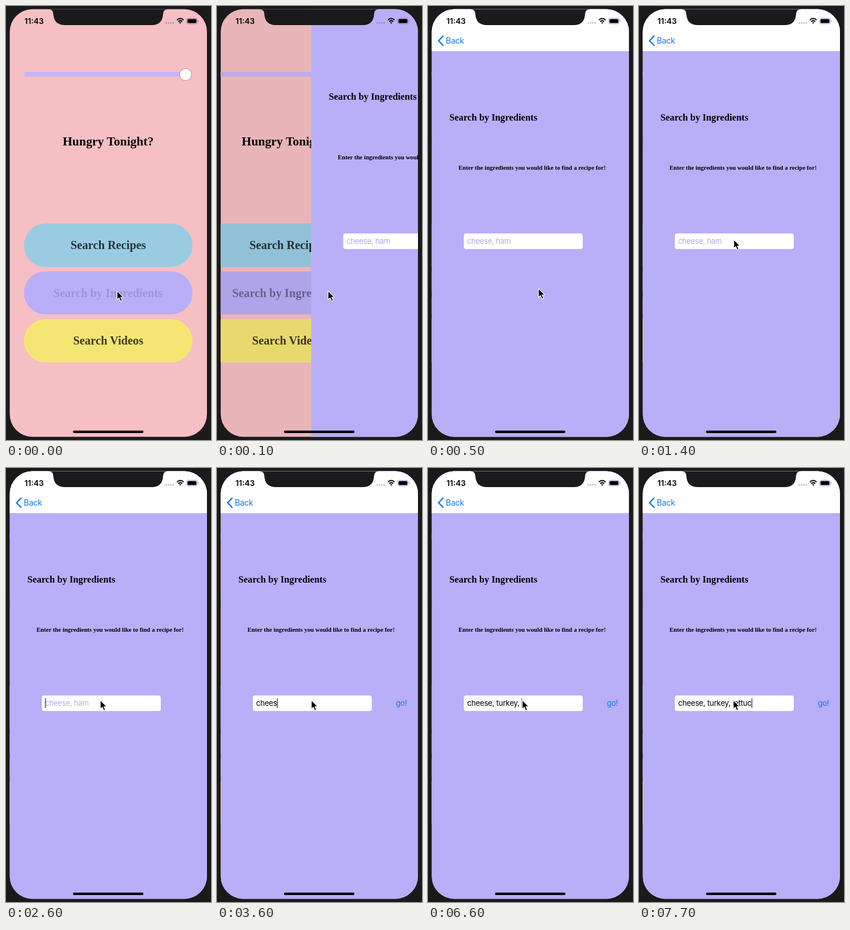
Recreate the animation shown at these times as an HTML page. Size 355 by 750 pixels, loop 8 s.

```html
<!DOCTYPE html>
<html lang="en">
<head>
<meta charset="utf-8">
<title>Ingredient search</title>
<style>
  html, body { margin: 0; width: 100%; height: 100%; overflow: hidden; background: #1a1a1a; }
  svg { display: block; width: 355px; height: 750px; }
  text { font-family: Inter, sans-serif; }
  .serif { font-family: "Liberation Serif", serif; font-weight: 700; }
  .button { font-size: 20.25px; text-anchor: middle; fill-opacity: .75; }
  .field { font-size: 13.2px; letter-spacing: -.3px; }
  .blue { fill: #1279ea; }
</style>
</head>
<body>
<svg viewBox="0 0 355 750">
  <defs>
    <clipPath id="screen"><rect x="6.5" y="5.5" width="341.5" height="739" rx="39"/></clipPath>
  </defs>

  <g clip-path="url(#screen)">
    <rect width="355" height="750" fill="#f6bfc4"/>
    <g id="home">
      <rect x="32" y="114" width="279" height="8" fill="#c8b3fa"/>
      <circle cx="311" cy="118.5" r="10.3" fill="#fff" stroke="#8d8389" stroke-width=".8"/>
      <text class="serif" x="177" y="241" font-size="21.4" text-anchor="middle">Hungry Tonight?</text>
      <rect x="31" y="376" width="292" height="75" rx="37.5" fill="#99cce3"/>
      <rect x="31" y="458.5" width="292" height="74.5" rx="37.2" fill="#b9aef8"/>
      <rect x="31" y="541" width="292" height="75" rx="37.5" fill="#f5e674"/>
      <text class="serif button" x="177" y="420">Search Recipes</text>
      <text class="serif button" x="176.5" y="502.5" id="pressed">Search by Ingredients</text>
      <text class="serif button" x="177" y="585">Search Videos</text>
    </g>
    <rect id="dim" width="355" height="750"/>

    <g id="detail">
      <rect x="6.5" width="349" height="750" fill="#b9aef8"/>
      <text class="serif" id="title" x="37" font-size="16.3">Search by Ingredients</text>
      <text class="serif" id="hint" x="52.7" font-size="10.64">Enter the ingredients you would like to find a recipe for!</text>
      <rect x="62" y="393" width="206" height="27" rx="4" fill="#fff"/>
      <text class="field" id="placeholder" x="67.7" y="411" font-weight="300" fill="#a28fe6">cheese, ham</text>
      <text class="field" id="typed" x="67.7" y="411" xml:space="preserve"></text>
      <rect id="caret" y="398" width="1.7" height="16.5" fill="#3f55d6"/>
      <text class="field blue" id="go" x="309.8" y="411">go!</text>
    </g>

    <g id="bar">
      <rect width="355" height="78" fill="#fff"/>
      <path d="M26 52 18.3 60 26 68" fill="none" stroke="#1279ea" stroke-width="2.4" stroke-linecap="round" stroke-linejoin="round"/>
      <text class="blue" x="30.8" y="65" font-size="14" letter-spacing="-.3">Back</text>
    </g>

    <path d="M74 0V5.5Q82 6 82 14Q83 33 102 33H252Q271 33 272 14Q272 6 280 5.5V0Z" fill="#1a1a1a"/>
    <text x="32" y="31" font-size="13.5" font-weight="600">11:43</text>
    <g id="dots">
      <circle cx="277.5" cy="29.3" r="1.2"/><circle cx="281.5" cy="29.3" r="1.2"/>
      <circle cx="285.5" cy="29.3" r="1.2"/><circle cx="289.5" cy="29.3" r="1.2"/>
    </g>
    <g fill="none" stroke="#000" stroke-width="2">
      <path d="M296 24.3Q301.7 18.8 307.4 24.3M298.3 27Q301.7 23.7 305.1 27"/>
      <path d="M299.8 28.6Q301.7 27.2 303.6 28.6L301.7 30.8Z" fill="#000" stroke="none"/>
    </g>
    <g id="shell">
      <rect x="312.7" y="21" width="18.6" height="10" rx="3" fill="none" stroke-width="1"/>
      <path d="M332.5 24.3Q334.6 26 332.5 27.7Z" stroke-width=".5"/>
    </g>
    <rect x="314.2" y="22.4" width="15.6" height="7.2" rx="1.6"/>
    <rect x="116" y="733.8" width="122" height="4.2" rx="2.1"/>
  </g>

  <path id="pointer" d="M0 0V15.2L3.5 12 6.1 18 8.8 16.8 6.2 11H11Z" stroke="#fff" stroke-width="1.1" stroke-linejoin="round"/>
</svg>

<script>
const LOOP = 8000, STEP = 100, WIDTH = 341.5;
const FOCUS = 1600, BAR_SHOWN = 400;
const CARET_HOLD = 400, BLINK = 800;
const PHRASE = "cheese, turkey, lettuc";
const KEY_TIMES = [3000, 3100, 3200, 3400, 3600, 3800, 4000, 4100,
  4500, 4900, 5000, 5200, 5400, 5500, 5600, 5700,
  6800, 7100, 7400, 7500, 7600, 7700];

const el = {};
document.querySelectorAll("svg [id]").forEach(node => el[node.id] = node);

const set = (node, attrs) => {
  for (const name in attrs) node.setAttribute(name, attrs[name]);
};
const show = (node, on) => node.setAttribute("visibility", on ? "visible" : "hidden");
const clamp = v => Math.min(1, Math.max(0, v));
const smooth = v => (v = clamp(v)) * v * (3 - 2 * v);

// Critically damped spring for the screen push.
function pushed(t) {
  if (t >= BAR_SHOWN) return 1;
  const x = t * 0.01815;
  return 1 - (1 + x) * Math.exp(-x);
}

// Solid after each key, then fading out and in.
function caretAlpha(t, lastKey) {
  const since = t - lastKey - CARET_HOLD;
  if (since < 0) return 1;
  const phase = since % BLINK + STEP;
  return phase <= 400 ? clamp(1 - phase / 300) : clamp((phase - 400) / 300);
}

function drawPush(t) {
  const p = pushed(t), bar = t >= BAR_SHOWN;
  set(el.home, { transform: `translate(${-0.3 * WIDTH * p})` });
  set(el.dim, { opacity: 0.1 * p });
  set(el.detail, { transform: `translate(${WIDTH * (1 - p)})` });
  set(el.pressed, { style: `fill-opacity:${0.14 + 0.5 * p}` });
  set(el.title, { y: bar ? 197.5 : 161.5 });
  set(el.hint, { y: bar ? 282.7 : 264.7 });
  show(el.bar, bar);
  const tint = bar ? "#b3a5ea" : "#a18a98";
  set(el.dots, { fill: tint });
  set(el.shell, { fill: tint, stroke: tint });
}

function drawField(t) {
  const count = KEY_TIMES.filter(key => key <= t).length;
  el.typed.textContent = PHRASE.slice(0, count);
  show(el.placeholder, !count);
  show(el.go, count > 0);
  show(el.caret, t >= FOCUS);
  set(el.caret, {
    x: 67.5 + (count ? el.typed.getComputedTextLength() : 0),
    opacity: caretAlpha(t, count ? KEY_TIMES[count - 1] : FOCUS)
  });
}

function drawPointer(t) {
  const drift = smooth((t - 200) / 300), glide = smooth((t - 500) / 1000);
  const x = 192.3 - drift - 28 * glide;
  const y = 492.3 - 4 * drift - 87 * glide;
  set(el.pointer, { transform: `translate(${x} ${y})` });
}

const start = performance.now();
function frame() {
  const elapsed = (performance.now() - start) % LOOP;
  const t = Math.floor(elapsed / STEP) * STEP;
  drawPush(t);
  drawField(t);
  drawPointer(t);
  requestAnimationFrame(frame);
}
frame();
</script>
</body>
</html>
```
